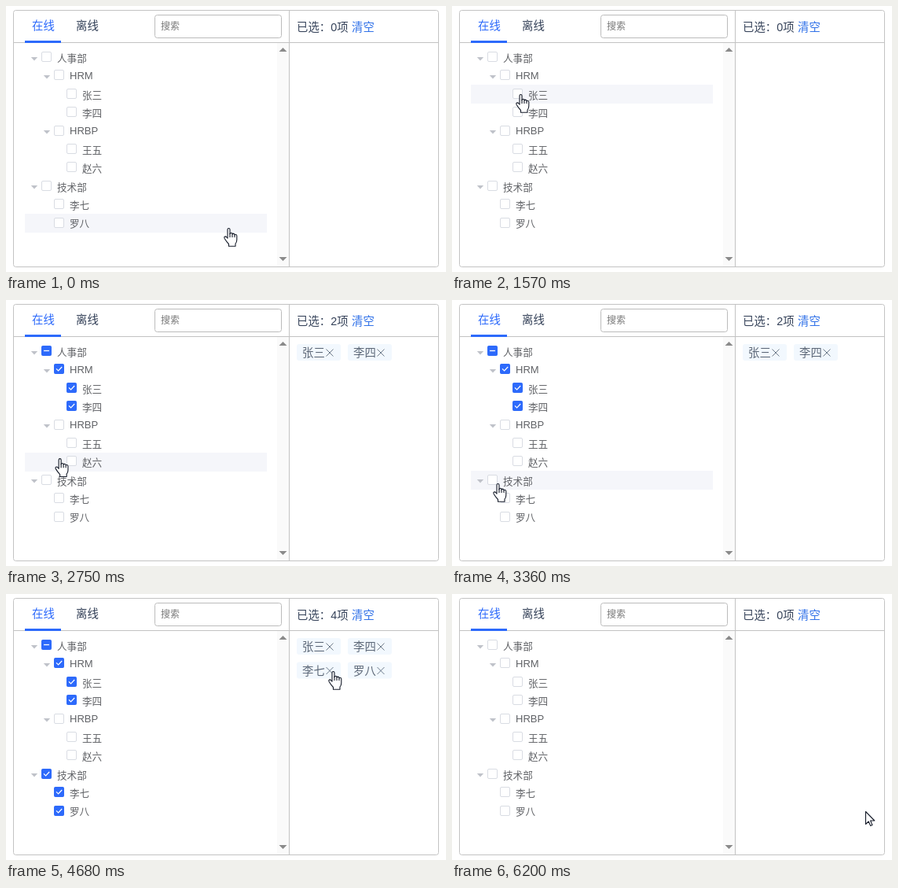
An HTML page with a canvas that plays this animation: 560 px wide and 338 px high, repeating every 6.27 s.

```html
<!DOCTYPE html>
<html lang="zh-CN">
<head>
<meta charset="utf-8">
<style>
  html, body { margin: 0; width: 100%; height: 100%; overflow: hidden; background: #fff; }
  canvas { display: block; width: 560px; height: 338px; }
</style>
</head>
<body>
<canvas id="stage" lang="zh-CN"></canvas>
<script>
const W = 560, H = 338, LOOP = 6270;
const FONT = '"Liberation Sans", "Noto Sans CJK SC", "Noto Sans CJK", sans-serif';
const BLUE = '#2d6afb', INK = '#36435a';

const canvas = document.getElementById('stage');
const g = canvas.getContext('2d');
const ratio = window.devicePixelRatio || 1;
canvas.width = W * ratio;
canvas.height = H * ratio;

// label, depth, time checked, time unchecked
const rows = [
  ['人事部', 0], ['HRM', 1], ['张三', 2, 1840, 5710], ['李四', 2, 2400, 5710],
  ['HRBP', 1], ['王五', 2], ['赵六', 2],
  ['技术部', 0], ['李七', 1, 3630, 4880], ['罗八', 1, 3630, 5710]
].map(([label, depth, on = Infinity, off = Infinity]) => ({ label, depth, on, off }));

const PITCH = 23.4, TOP = 53.4;

rows.forEach((row, i) => {
  row.parent = i + 1 < rows.length && rows[i + 1].depth > row.depth;
});
rows.forEach((row, i) => {
  row.leaves = row.parent ? [] : [row];
  for (let j = i + 1; j < rows.length && rows[j].depth > row.depth; j++) {
    if (!rows[j].parent) row.leaves.push(rows[j]);
  }
});

// Pointer hotspot: time, x, y
const path = [
  [0, 283, 282], [120, 283, 282], [750, 365, 171], [900, 365, 171],
  [1560, 87, 112], [1900, 87, 112], [2130, 86, 129], [2470, 86, 129],
  [2890, 62, 226], [2960, 71, 237], [3200, 58, 233], [3700, 58, 233],
  [4640, 416, 98], [4950, 416, 98], [5510, 454, 29], [5930, 454, 29],
  [6200, 526, 276], [LOOP, 526, 276]
];
const presses = [[1710, 1840], [2260, 2400], [3500, 3630], [4810, 4880], [5580, 5710]];

const clamp = v => Math.max(0, Math.min(1, v));
const ease = v => v * v * (3 - 2 * v);
const isOn = (row, t) => t >= row.on && t < row.off;
const level = (row, t) => ease(clamp((t - row.on) / 160)) - ease(clamp((t - row.off) / 160));

function pointerAt(t) {
  let i = 0;
  while (i < path.length - 2 && t >= path[i + 1][0]) i++;
  const [t0, x0, y0] = path[i], [t1, x1, y1] = path[i + 1];
  const k = ease(clamp((t - t0) / (t1 - t0)));
  return { x: x0 + (x1 - x0) * k, y: y0 + (y1 - y0) * k };
}

function text(str, x, y, size, color) {
  g.font = size + 'px ' + FONT;
  g.fillStyle = color;
  g.fillText(str, x, y);
}

function box(x, y, w, h, r, fill, stroke) {
  g.beginPath();
  g.roundRect(x, y, w, h, r);
  if (fill) { g.fillStyle = fill; g.fill(); }
  if (stroke) { g.strokeStyle = stroke; g.lineWidth = 1; g.stroke(); }
}

function line(points, color, width) {
  g.beginPath();
  points.forEach(([x, y]) => g.lineTo(x, y));
  g.strokeStyle = color;
  g.lineWidth = width;
  g.stroke();
}

function triangle(x, y, half, h, color) {
  g.beginPath();
  g.moveTo(x - half, y);
  g.lineTo(x + half, y);
  g.lineTo(x, y + h);
  g.fillStyle = color;
  g.fill();
}

function drawFrame() {
  box(345, 47, 15, 284, 0, '#fafafa');
  triangle(352.5, 58, 5, -5, '#8a8a8a');
  triangle(352.5, 319, 5, 5, '#8a8a8a');
  box(9.5, 5.5, 541, 326, 3, null, '#c3c3c3');
  line([[360.5, 6], [360.5, 331]], '#c3c3c3', 1);
  line([[10, 46.5], [550, 46.5]], '#c3c3c3', 1);
  text('在线', 33, 30, 14.4, BLUE);
  text('离线', 89, 30, 14.4, INK);
  box(24, 44, 46, 3, 0, BLUE);
  box(189.5, 11.5, 161, 29, 3, '#fff', '#bcbcbc');
  text('搜索', 197, 30, 12, '#777');
}

function drawCheckbox(row, x, y, t) {
  box(x + 0.5, y + 0.5, 12, 12, 1.5, '#fff', '#d9dce3');
  const fill = Math.max(...row.leaves.map(leaf => level(leaf, t)));
  if (fill <= 0) return;
  g.globalAlpha = fill;
  box(x, y, 13, 13, 2, BLUE);
  if (row.leaves.every(leaf => isOn(leaf, t))) {
    line([[x + 3, y + 6.4], [x + 5.6, y + 9], [x + 10.2, y + 4]], '#fff', 1.2);
  } else if (row.leaves.some(leaf => isOn(leaf, t))) {
    line([[x + 3, y + 6.5], [x + 10, y + 6.5]], '#fff', 1.3);
  }
  g.globalAlpha = 1;
}

function drawTree(t, hover) {
  if (hover >= 0) box(24, Math.round(TOP + PITCH * hover), 308, 24, 0, '#f5f6fa');
  rows.forEach((row, i) => {
    const dx = 16 * row.depth, dy = PITCH * i;
    if (row.parent) triangle(36 + dx, Math.round(64.5 + dy), 4.2, 4.5, '#bfc2c9');
    drawCheckbox(row, 45 + dx, Math.round(58 + dy), t);
    const latin = row.label < '一';
    text(row.label, 65 + dx, Math.round(70.8 + dy) - (latin ? 1 : 0), latin ? 13 : 12.6, '#606266');
  });
}

const tagSpot = i => ({ x: 370 + 65 * (i % 2), y: 56 + 30.5 * Math.floor(i / 2) });

function drawPicked(picked) {
  text('已选：' + picked.length + '项', 370, 32, 14.4, INK);
  text('清空', 440, 32, 14.4, '#2d6fe8');
  picked.forEach((row, i) => {
    const { x, y } = tagSpot(i), cx = x + 42, cy = y + 11;
    box(x, y, 56, 21, 3, '#f2f8fe');
    text(row.label, x + 7, y + 16, 14.4, '#5d6878');
    line([[cx - 4.5, cy - 4.5], [cx + 4.5, cy + 4.5]], '#6c7a8b', 1);
    line([[cx + 4.5, cy - 4.5], [cx - 4.5, cy + 4.5]], '#6c7a8b', 1);
  });
}

const handShape = new Path2D('M5 2Q5 .5 6.5 .5Q8 .5 8 2V7.6Q8.3 6.3 9.5 6.3Q11 6.3 11 8' +
  'Q11.3 7.1 12.5 7.1Q14 7.2 14 9Q14.3 8.2 15.3 8.3Q16.8 8.5 16.8 10V15Q16.8 18 15 20V23.3H6.5V20.5' +
  'Q4 18 1.2 13.5Q.2 11.8 1.5 11Q2.8 10.4 4 12L5 13.2Z');
const knuckles = new Path2D('M8 7V12M11 8V12M14 9V12');
const arrowShape = new Path2D('M.5 .5V16.5L4.2 13L6.7 18.6L9 17.6L6.6 12H11.8Z');

function drawPointer({ x, y }, hand) {
  g.save();
  g.translate(x - (hand ? 6 : 0), y);
  g.lineJoin = 'round';
  g.fillStyle = '#fff';
  g.strokeStyle = '#141a28';
  g.lineWidth = 1.1;
  const shape = hand ? handShape : arrowShape;
  g.fill(shape);
  g.stroke(shape);
  if (hand) g.stroke(knuckles);
  g.restore();
}

function draw(t) {
  const p = pointerAt(t);
  const picked = rows.filter(row => isOn(row, t));
  const overTree = p.x >= 24 && p.x < 332 && p.y >= TOP && p.y < TOP + PITCH * rows.length;
  const hover = overTree ? Math.floor((p.y - TOP) / PITCH) : -1;
  const overClear = p.x > 440 && p.x < 468 && p.y > 18 && p.y < 38;
  const overClose = picked.some((row, i) => {
    const s = tagSpot(i);
    return Math.hypot(p.x - s.x - 42, p.y - s.y - 11) < 8;
  });

  g.setTransform(ratio, 0, 0, ratio, 0, 0);
  g.fillStyle = '#fff';
  g.fillRect(0, 0, W, H);
  drawFrame();
  drawTree(t, hover);
  drawPicked(picked);
  if (presses.some(([a, b]) => t >= a && t < b)) {
    g.beginPath();
    g.arc(p.x + 1, p.y + 0.5, 12, 0, Math.PI * 2);
    g.fillStyle = 'rgba(245, 245, 20, .65)';
    g.fill();
  }
  drawPointer(p, overTree || overClear || overClose);
}

const start = performance.now();
function tick() {
  draw((performance.now() - start) % LOOP);
  requestAnimationFrame(tick);
}
tick();
</script>
</body>
</html>
```
